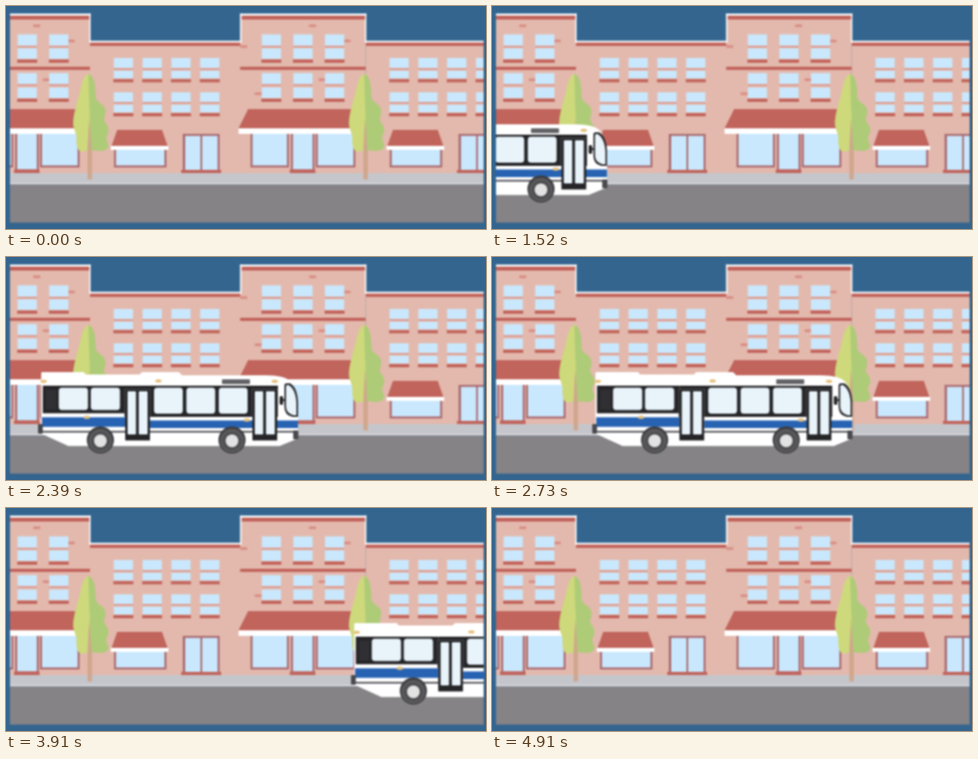
An HTML page with a canvas that plays this animation: 600 by 279 pixels, repeating every 4940 ms.

```html
<!DOCTYPE html>
<html lang="en">
<head>
<meta charset="utf-8">
<title>City bus</title>
<style>
html, body { margin: 0; width: 100%; height: 100%; overflow: hidden; background: #33658f; }
canvas { display: block; filter: blur(.8px); }
</style>
</head>
<body>
<canvas id="stage" width="600" height="279"></canvas>
<script>
const LOOP = 4940;
const TILE = 344.7;
const SKY = '#33658f', WALL = '#e3b9ad', RED = '#c1645c', GLASS = '#c9e8fd',
  FRAME = '#aa6a70', BRICK = '#d98f86', WHITE = '#fff', DARK = '#252528',
  BLUE = '#2763b2', PANE = '#e8f3fa';

const stage = document.getElementById('stage').getContext('2d');
const street = document.createElement('canvas');
street.width = 600;
street.height = 279;
let ctx = street.getContext('2d');

// Rectangles are given by their edges.
function box(color, l, t, r, b, radius = 0) {
  ctx.fillStyle = color;
  ctx.beginPath();
  ctx.roundRect(l, t, r - l, b - t, radius);
  ctx.fill();
}

function shape(color, path) {
  ctx.fillStyle = color;
  ctx.fill(new Path2D(path));
}

function disc(color, x, y, rx, ry = rx) {
  ctx.fillStyle = color;
  ctx.beginPath();
  ctx.ellipse(x, y, rx, ry, 0, 0, Math.PI * 2);
  ctx.fill();
}

// Draws at a horizontal offset, limited to the visible scene.
function inScene(shift, draw) {
  ctx.save();
  ctx.beginPath();
  ctx.rect(5, 8, 592, 263);
  ctx.clip();
  ctx.translate(shift, 0);
  draw();
  ctx.restore();
}

function sash(x, y, upper, gap, lower) {
  const mid = y + upper, low = mid + gap, sill = low + lower + 1;
  box(GLASS, x, y, x + 24, mid);
  box(BRICK, x, mid + .5, x + 24, mid + 2);
  box(GLASS, x, low, x + 24, low + lower);
  box(RED, x - .5, sill, x + 24.5, sill + 4);
}

function pane(l, t, r, b, rim = 2.5) {
  box(FRAME, l, t, r, b);
  box(GLASS, l + rim, t, r - rim, b - rim);
}

function tallHouse() {
  box(WALL, -52, 10, 105, 210);
  box(WHITE, -52, 9.5, -50.3, 46);
  box(WHITE, 104, 9.5, 105.7, 46);
  box(WHITE, -52, 9.5, 105.7, 12);
  box(RED, -50, 12, 104, 17);
  box(RED, -52, 76, 105, 80);
  for (const [x, y] of [[34, 23], [77, 42], [46, 90.5], [-34, 108], [-52, 49]])
    box(BRICK, x, y, x + 9, y + 3.5, 1);
  for (const x of [-25, 14.5, 54]) {
    sash(x, 35.5, 14, 3.5, 13);
    sash(x, 84, 13.5, 4.5, 13);
  }
  pane(-39, 158, 9, 202);
  pane(42.5, 158, 92, 202);
  pane(11.5, 158, 41, 207);
  box(RED, 10, 204.5, 42, 209);
  shape(RED, 'M-42 129H94L106 153H-54Z');
  box(WHITE, -54, 153, 106, 160);
}

function lowHouse() {
  box(WALL, 105, 45, 293, 210);
  box(WHITE, 105, 43.5, 293, 45.7);
  box(RED, 105, 45.7, 293, 50);
  for (let i = 0; i < 4; i++) {
    sash(134.7 + i * 36, 65, 12.5, 3.5, 9.5);
    sash(134.7 + i * 36, 108, 12, 3.5, 9.5);
  }
  pane(135, 178, 200.5, 202);
  shape(RED, 'M139 155H195L202 175H132Z');
  box(WHITE, 131, 175, 203, 180);
  box(FRAME, 221, 160, 267, 207);
  box(GLASS, 224, 162.5, 243, 205);
  box(GLASS, 245.2, 162.5, 264.5, 205);
  box(RED, 219, 205, 269, 209);
}

function tree() {
  box('#d0a68d', 102, 170, 107.5, 217);
  shape('#cdd97b', 'M104 85C97 86 95 96 92.5 107C90 119 83 136 84 149' +
    'C85 156 89 160 88 168C88 177 91 184 97 182Q102 181 106 178V86Z');
  shape('#aecb77', 'M103 85C110 87 112 98 112 114C113 121 121 121 124 129' +
    'C126 138 121 138 123 144C128 150 130 156 126 162C123 169 132 174 126 179' +
    'C120 184 112 179 104 181Q106 150 104 122Z');
  shape('#d0a68d', 'M104 140L107 180H102Z');
}

function drawStreet() {
  box(SKY, 0, 0, 600, 279);
  for (const shift of [0, TILE]) {
    inScene(shift, () => {
      lowHouse();
      tallHouse();
    });
  }
  box('#c5c6cb', 5, 209, 597, 221);
  box('#d6d6d8', 5, 221, 597, 223.5);
  box('#858386', 5, 223.5, 597, 271);
  for (const shift of [0, TILE]) inScene(shift, tree);
}

function busDoor(x) {
  box('#505054', x - 1, 165, x + 32, 200);
  box(DARK, x, 166, x + 31, 229.5);
  box(PANE, x + 3, 168, x + 13.5, 222, 1);
  box(PANE, x + 17, 168, x + 28, 222, 1);
}

function wheel(x) {
  disc('#3c3c40', x, 229, 17);
  disc('#59595c', x, 230, 15);
  disc('#4b4b4e', x, 230, 11);
  disc('#e2e2e3', x, 230, 8);
}

function drawBus() {
  shape(WHITE, 'M129 145Q129 144 131 144H182L185 147H252L255 144H301L305 148H410' +
    'Q434 148 441 156Q449 166 450 185V227L427 236.5H163L129 221Z');
  box(DARK, 131, 161, 234, 195.5);
  box(DARK, 234, 161, 425, 200);
  box('#303034', 135, 166, 148, 191);
  for (const x of [151, 191]) box(PANE, x, 163.5, x + 36.5, 191.5, 4);
  for (const x of [270, 310.5, 351]) box(PANE, x, 163.5, x + 36, 196, 4);
  box(BLUE, 130, 200.5, 234, 212.5);
  box(BLUE, 265, 204.5, 450, 214);
  box('#57575c', 130, 217.5, 450, 219.8);
  busDoor(234);
  busDoor(393);

  shape(DARK, 'M433 161Q433 158 436 158H440Q449 163 450 181V200H443Q433 198 433 187Z');
  shape(PANE, 'M435 162Q435 160 438 160Q447 165 448 182V198H444Q435 195 435 187Z');
  box(DARK, 427, 174, 431.5, 185, 2);
  box(DARK, 430, 178, 434, 180);
  box('#636367', 355, 153, 390, 159, 1);
  box('#49494d', 125, 209, 131, 221, 1);
  box('#49494d', 444, 217, 450.5, 228, 1);
  for (const [x, y] of [[132, 155.5], [275.5, 155], [421, 155.5], [186, 200.5], [386, 204]])
    disc('#e6c07a', x, y, 4, 2);
  wheel(203);
  wheel(367.5);
}

// Time and horizontal offset of the bus.
const drive = [[900, -465], [1520, -306.5], [2090, -160.5], [2730, 0],
  [3210, 130], [3910, 306], [4640, 493]];

function busOffset(t) {
  const i = drive.findIndex(([time]) => time > t);
  if (i < 1) return null;
  const [t0, x0] = drive[i - 1], [t1, x1] = drive[i];
  return x0 + (x1 - x0) * (t - t0) / (t1 - t0);
}

drawStreet();
ctx = stage;

function render() {
  const x = busOffset((performance.now() - start) % LOOP);
  ctx.drawImage(street, 0, 0);
  if (x !== null) inScene(x, drawBus);
  requestAnimationFrame(render);
}

const start = performance.now();
render();
</script>
</body>
</html>
```
